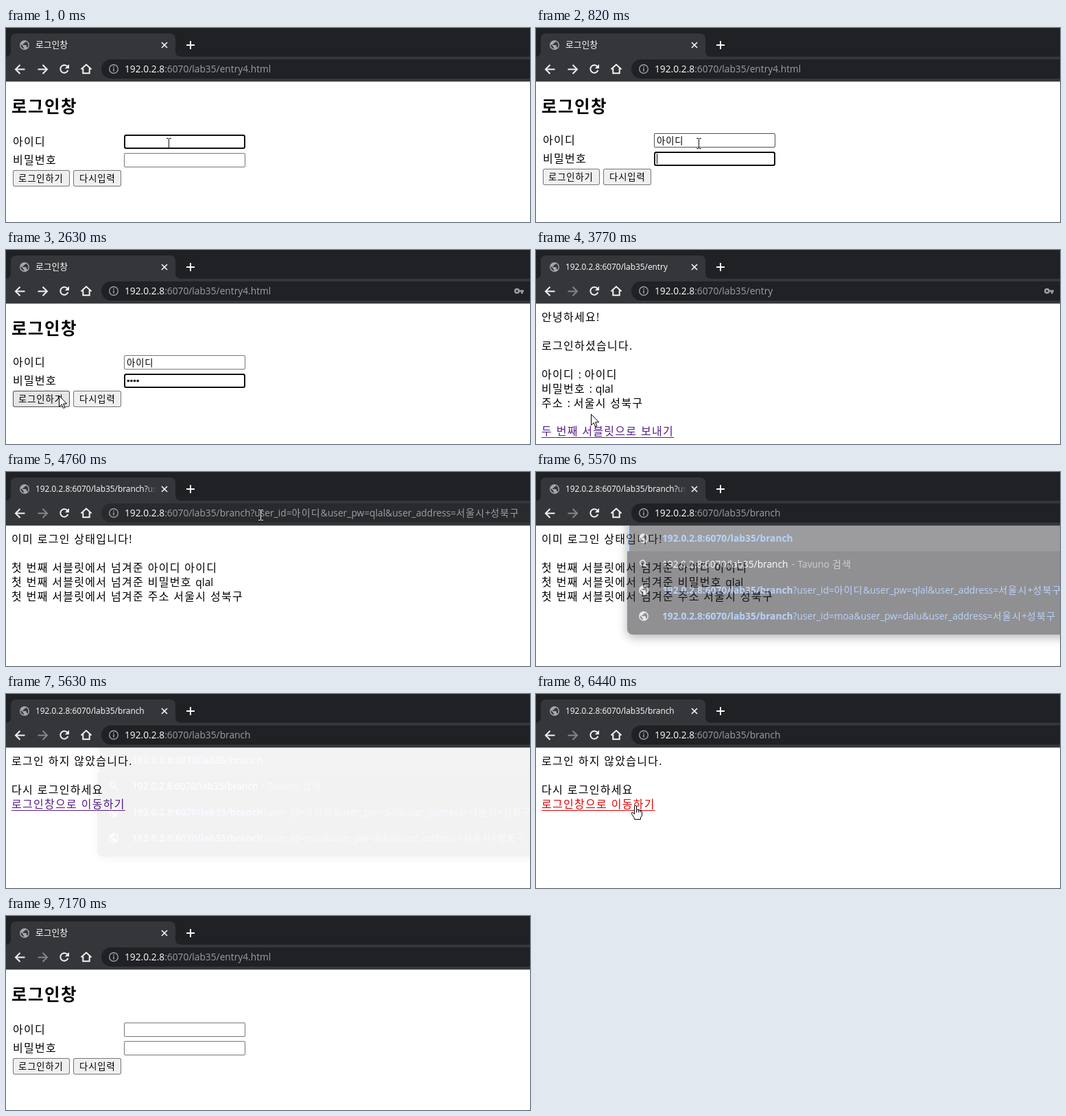
An HTML page with a canvas for the animation above (7300 ms loop, 764 by 284 pixels).

```html
<!DOCTYPE html>
<html lang="ko">
<head>
<meta charset="utf-8">
<title>로그인창</title>
<style>
html, body { margin: 0; width: 764px; height: 284px; overflow: hidden; background: #fff; }
canvas { display: block; }
</style>
</head>
<body>
<canvas id="stage" width="764" height="284"></canvas>
<script>
const W = 764, H = 284, LOOP = 7300;
const screen2d = document.getElementById('stage').getContext('2d');
const layer = document.createElement('canvas');
layer.width = W;
layer.height = H;
let g = screen2d;

const HOST = '192.0.2.8';
const FORM = ':6070/lab35/entry4.html';
const HELLO = ':6070/lab35/entry';
const NEXT = ':6070/lab35/branch';
const ADDRESS = '&user_address=서울시+성북구';
const QUERY = '?user_id=아이디&user_pw=qlal' + ADDRESS;
const OTHER = '?user_id=moa&user_pw=dalu' + ADDRESS;

const UI = { size: 13.75, ko: 14, gap: 1.2 };
const BOLD = { ...UI, weight: 700 };
const TAB = { size: 11.9, ko: 12.8, gap: 0 };
const BODY = { size: 15.5, ko: 16, gap: 1.28, space: 0.8 };
const CTRL = { size: 13, ko: 13.3, gap: 0.9 };
const HEAD = { size: 24, ko: 24.5, gap: 1.5, weight: 700 };

// Latest value in a list of [time, value]
function at(t, list) {
  let v = list[0][1];
  for (const [time, value] of list) if (t >= time) v = value;
  return v;
}

// Writes mixed Korean and Latin text, returns the end x
function write(str, x, y, style, color) {
  const weight = style.weight || 400;
  g.fillStyle = color;
  g.wordSpacing = (style.space || 0) + 'px';
  for (const run of str.match(/[\u3131-\uD7A3 ]+|[^\u3131-\uD7A3 ]+/g) || []) {
    const korean = /[\u3131-\uD7A3 ]/.test(run);
    g.font = korean
      ? `${weight} ${style.ko}px "Noto Sans CJK KR", "Noto Sans CJK", sans-serif`
      : `${weight} ${style.size}px "Open Sans", "Noto Sans", sans-serif`;
    g.letterSpacing = (korean ? style.gap : 0) + 'px';
    g.fillText(run, x, y);
    x += g.measureText(run).width;
  }
  return x;
}

function rect(x, y, w, h, color) {
  g.fillStyle = color;
  g.fillRect(x, y, w, h);
}

function round(x, y, w, h, r, color) {
  g.beginPath();
  g.roundRect(x, y, w, h, r);
  g.fillStyle = color;
  g.fill();
}

function disc(x, y, r, color) {
  g.beginPath();
  g.arc(x, y, r, 0, Math.PI * 2);
  g.fillStyle = color;
  g.fill();
}

function trace(points, x, y, k = 1) {
  g.beginPath();
  points.forEach(([px, py], i) => g[i ? 'lineTo' : 'moveTo'](x + px * k, y + py * k));
}

function line(points, x, y, color, width) {
  trace(points, x, y);
  g.strokeStyle = color;
  g.lineWidth = width;
  g.stroke();
}

function blob(points, x, y, color, k) {
  trace(points, x, y, k);
  g.closePath();
  g.fillStyle = color;
  g.fill();
}

function globe(x, y, color, sea) {
  disc(x, y, 7, color);
  blob([[-1, 7.9], [-5, 6.2], [-7.7, 2.5], [-7.8, -1.8], [-3, 3], [-3, 4], [-1, 6]], x, y, sea, 0.7);
  blob([[6.9, 5.4], [5, 4], [4, 4], [4, 1], [3, 0], [-4, 0], [-4, -2], [-2, -2], [-1, -3],
    [-1, -5], [1, -5], [3, -7], [3, -7.4], [6.6, -4.5], [8, 0]], x, y, sea, 0.7);
}

function arrowIcon(x, dir, color) {
  line([[-6.5 * dir, 0], [6 * dir, 0]], x, 60.5, color, 2);
  line([[0.5 * dir, -6.5], [7 * dir, 0], [0.5 * dir, 6.5]], x, 60.5, color, 2);
}

function keyIcon() {
  const c = '#9aa0a6';
  g.beginPath();
  g.arc(745, 60, 2.8, 0, Math.PI * 2);
  g.strokeStyle = c;
  g.lineWidth = 2.4;
  g.stroke();
  rect(748, 58.7, 7, 2.6, c);
  rect(751, 60, 2.6, 4, c);
}

function drawTabs(t) {
  rect(0, 0, W, 42, '#202124');
  rect(0, 42, W, 36, '#35363a');
  rect(0, 78, W, 1, '#a2a3a4');
  g.beginPath();
  g.moveTo(-1, 42);
  g.quadraticCurveTo(7, 42, 7, 34);
  g.lineTo(7, 16);
  g.quadraticCurveTo(7, 8, 15, 8);
  g.lineTo(239, 8);
  g.quadraticCurveTo(247, 8, 247, 16);
  g.lineTo(247, 34);
  g.quadraticCurveTo(247, 42, 255, 42);
  g.fillStyle = '#35363a';
  g.fill();
  globe(27, 25, '#a4a8ac', '#35363a');
  const fade = g.createLinearGradient(203, 0, 219, 0);
  fade.addColorStop(0, '#fff');
  fade.addColorStop(1, 'rgba(255,255,255,0)');
  const title = at(t, [[0, '로그인창'], [2770, HOST + HELLO],
    [4040, HOST + NEXT + QUERY], [5630, HOST + NEXT], [6570, '로그인창']]);
  write(title, 43, 28.5, TAB, fade);
  line([[-4, -4], [4, 4]], 231, 25, '#f1f3f4', 1.7);
  line([[4, -4], [-4, 4]], 231, 25, '#f1f3f4', 1.7);
  rect(263, 24, 12, 2, '#fff');
  rect(268, 19, 2, 12, '#fff');
}

function drawToolbar(t) {
  const white = '#f1f3f4';
  arrowIcon(21, -1, white);
  arrowIcon(53, 1, t < 2770 ? white : '#85878a');
  g.beginPath();
  g.arc(85, 60, 5.7, 0.35, Math.PI * 1.78);
  g.strokeStyle = white;
  g.lineWidth = 2;
  g.stroke();
  blob([[7, -7], [7, -0.8], [0.8, -0.8]], 85, 60, white);
  line([[-7.5, 0.5], [0, -6.5], [7.5, 0.5]], 117, 60, white, 2);
  line([[-4.7, -1], [-4.7, 6.2], [4.7, 6.2], [4.7, -1]], 117, 60, white, 2);

  const mouse = cursor(t);
  const hover = mouse.kind === 'text' && mouse.y < 78;
  round(139, 46, 660, 28, 14, hover ? '#292a2d' : '#202124');
  g.beginPath();
  g.arc(157, 60, 6.3, 0, Math.PI * 2);
  g.strokeStyle = '#9aa0a6';
  g.lineWidth = 1.4;
  g.stroke();
  rect(156.2, 59, 1.6, 4.5, '#9aa0a6');
  rect(156.2, 56.3, 1.6, 1.6, '#9aa0a6');

  if (t < 5100 || t >= 5570) {
    const path = at(t, [[0, FORM], [2770, HELLO], [4040, NEXT + QUERY], [5570, NEXT], [6500, FORM]]);
    const x = write(HOST, 173, 65, UI, '#fff');
    write(path, x, 65, UI, '#9aa0a6');
    if (t >= 4830 && t < 5100) drawSelection(t, x);
  }
  if (t >= 1290 && t < 4040) keyIcon();
}

function drawSelection(t, x) {
  const from = write(NEXT, x, 65, UI, 'rgba(0,0,0,0)');
  const to = Math.max(from + 1, cursor(t).x);
  rect(from, 51, to - from, 18, '#8ab4f8');
  g.save();
  g.beginPath();
  g.rect(from, 51, to - from, 18);
  g.clip();
  write(QUERY, from, 65, UI, '#202124');
  g.restore();
}

function field(y, focus, hover) {
  if (focus) {
    round(172, y, 177, 21, 3, '#101010');
    round(174, y + 2, 173, 17, 1.5, '#fff');
  } else {
    round(172, y, 177, 21, 2, hover ? '#505050' : '#767676');
    round(173, y + 1, 175, 19, 1, '#fff');
  }
}

function button(x, y, w, label, tx, hover) {
  round(x, y, w, 24, 3, hover ? '#4f4f4f' : '#767676');
  round(x + 1, y + 1, w - 2, 22, 2, hover ? '#e5e5e5' : '#efefef');
  write(label, tx, y + 17, CTRL, '#000');
}

function drawForm(t) {
  const dy = t >= 70 && t < 2770 ? -2 : 0;
  const first = t < 820, second = t >= 820 && t < 2700;
  const mouse = cursor(t);
  const typed = t >= 6500 ? '' : at(t, [[0, ''], [70, 'ㅇ'], [220, '아'], [300, '앙'],
    [390, '아이'], [470, '아읻'], [620, '아이디']]);
  const dots = t >= 6500 ? 0 : at(t, [[0, 0], [1290, 1], [1490, 2], [1620, 3], [1760, 4]]);

  write('로그인창', 8, 124, HEAD, '#000');
  write('아이디', 10, 172 + dy, BODY, '#000');
  write('비밀번호', 10, 199 + dy, BODY, '#000');
  field(156 + dy, first, mouse.kind === 'text' && mouse.y < 177);
  field(183 + dy, second, false);
  const end = write(typed, 176, 172 + dy, CTRL, '#000');
  if (first && t >= 70) rect(Math.round(end), 159, 1, 14, '#000');
  for (let i = 0; i < dots; i++) disc(178.3 + 4.6 * i, 193.5 + dy, 1.8, '#000');
  if (second && t < 2300) rect(Math.round(176 + 4.6 * dots), 184, 1, 15, '#000');

  const over = mouse.kind === 'arrow' && mouse.x < 93 && mouse.y > 206 && t < 2770;
  button(10, 208 + dy, 83, '로그인하기', 18, over);
  button(98, 208 + dy, 70, '다시입력', 107, false);
}

function lines(list) {
  list.forEach((s, i) => write(s, 8, 104 + 21 * i, BODY, '#000'));
}

function link(label, y, color) {
  const end = write(label, 8, y, BODY, color);
  rect(8, y + 3, end - 8, 1, color);
}

function drawPage(t) {
  rect(0, 79, W, H - 79, '#fff');
  const page = at(t, [[0, 'form'], [2770, 'hello'], [4040, 'passed'], [5630, 'denied'], [6500, 'form']]);
  if (page === 'form') drawForm(t);
  if (page === 'hello') {
    lines(['안녕하세요!', '', '로그인하셨습니다.', '', '아이디 : 아이디',
      '비밀번호 : qlal', '주소 : 서울시 성북구']);
    link('두 번째 서블릿으로 보내기', 271, t >= 3900 ? '#e00000' : '#551a8b');
  }
  if (page === 'passed') {
    const lead = '첫 번째 서블릿에서 넘겨준 ';
    lines(['이미 로그인 상태입니다!', '', lead + '아이디 아이디',
      lead + '비밀번호 qlal', lead + '주소 서울시 성북구']);
  }
  if (page === 'denied') {
    lines(['로그인 하지 않았습니다.', '', '다시 로그인하세요']);
    link('로그인창으로 이동하기', 167, t >= 6440 ? '#e00000' : '#551a8b');
  }
}

function paintPopup() {
  const blue = '#74a7f8', icon = '#d0d3d6', bg = '#222326';
  g.clearRect(0, 0, W, H);
  g.save();
  g.shadowColor = 'rgba(0,0,0,0.6)';
  g.shadowBlur = 15;
  g.shadowOffsetY = 4;
  round(133, 42, 660, 196, 8, bg);
  g.restore();
  rect(133, 78, W, 38, '#3a3b3e');
  rect(133, 78, 3, 38, '#8ab4f8');

  globe(157, 60, icon, bg);
  let x = write(HOST, 184, 65, UI, '#fff');
  x = write(NEXT, x, 65, UI, '#9aa0a6');
  rect(Math.round(x), 50, 1, 18, '#c8cacd');

  globe(157, 97, icon, '#3a3b3e');
  write(HOST + NEXT, 184, 102, BOLD, blue);

  g.beginPath();
  g.arc(155.5, 133, 3.8, 0, Math.PI * 2);
  g.strokeStyle = icon;
  g.lineWidth = 1.6;
  g.stroke();
  line([[0, 0], [4.5, 4.5]], 158, 135.6, icon, 1.8);
  x = write(HOST + NEXT, 184, 140, UI, '#fff');
  write(' - Tavuno 검색', x + 1, 140, UI, '#9aa0a6');

  [QUERY, OTHER].forEach((query, i) => {
    const y = 173 + 38 * i;
    globe(157, y, icon, bg);
    x = write(HOST + NEXT, 184, y + 5, BOLD, blue);
    write(query, x, y + 5, UI, blue);
  });
}

function drawPopup(t) {
  const alpha = at(t, [[0, 0], [5100, 0.45], [5170, 0.89], [5240, 1], [5570, 0.5], [5630, 0.06], [5700, 0]]);
  if (!alpha) return;
  g = layer.getContext('2d');
  paintPopup();
  g = screen2d;
  if (t < 5570) g.drawImage(layer, 0, 0, W, 78, 0, 0, W, 78);
  g.globalAlpha = alpha;
  g.drawImage(layer, 0, 78, W, H - 78, 0, 78, W, H - 78);
  g.globalAlpha = 1;
}

function cursor(t) {
  if (t >= 1950 && t < 2840) {
    const step = Math.min(10, 1 + Math.floor((t - 1950) / 75.5)) / 10;
    const u = step * step * (3 - 2 * step);
    const x = 237 - 160 * u, y = 168 + 45 * u;
    return { kind: x > 172 ? 'text' : 'arrow', x, y };
  }
  const [kind, x, y] = at(t, [
    [0, ['text', 237, 168]],
    [2840, ['text', 77, 213]],
    [3770, ['arrow', 80, 240]],
    [3900, ['hand', 88, 264]],
    [4760, ['text', 371, 62]],
    [4900, ['text', 470, 62]],
    [4970, ['text', 620, 61]],
    [5030, ['text', 752, 61]],
    [5100, ['none', 0, 0]],
    [6040, ['arrow', 245, 192]],
    [6110, ['arrow', 208, 182]],
    [6170, ['arrow', 170, 171]],
    [6240, ['hand', 145, 163]],
    [6500, ['arrow', 145, 163]],
    [6970, ['arrow', 205, 157]],
    [7040, ['arrow', 300, 184]],
    [7100, ['arrow', 390, 242]],
    [7170, ['none', 0, 0]]
  ]);
  return { kind, x, y };
}

function drawCursor(t) {
  const { kind, x, y } = cursor(t);
  if (kind === 'text') {
    const color = y < 79 ? '#e8eaed' : '#111';
    const px = Math.round(x), py = Math.round(y);
    rect(px, py - 6, 1, 14, color);
    for (const sy of [py - 7, py + 8]) {
      rect(px - 3, sy, 3, 1, color);
      rect(px + 1, sy, 3, 1, color);
    }
  }
  if (kind === 'arrow') {
    blob([[0.5, 0.5], [0.5, 16.5], [4.2, 13], [6.7, 18.6], [9, 17.6], [6.6, 12], [11.6, 12]], x, y, '#fff');
    g.strokeStyle = '#000';
    g.lineWidth = 1;
    g.stroke();
  }
  if (kind === 'hand') {
    blob([[-1.5, 1], [0, 0.4], [1.5, 1], [1.5, 6], [5, 6.6], [9, 8.4], [9.6, 10], [9.4, 15],
      [7.5, 18], [7.5, 20.5], [-1.5, 20.5], [-2, 18], [-5.5, 12.5], [-5.3, 10.6], [-3.8, 10.4], [-1.5, 13]], x, y, '#fff');
    g.strokeStyle = '#000';
    g.lineWidth = 1;
    g.stroke();
    for (const fx of [1.5, 4.3, 7]) line([[fx, 6.5], [fx, 10.5]], x, y, '#000', 1);
  }
}

const start = performance.now();

function frame() {
  const t = (performance.now() - start) % LOOP;
  drawPage(t);
  drawTabs(t);
  drawToolbar(t);
  drawPopup(t);
  drawCursor(t);
  requestAnimationFrame(frame);
}
frame();
</script>
</body>
</html>
```
